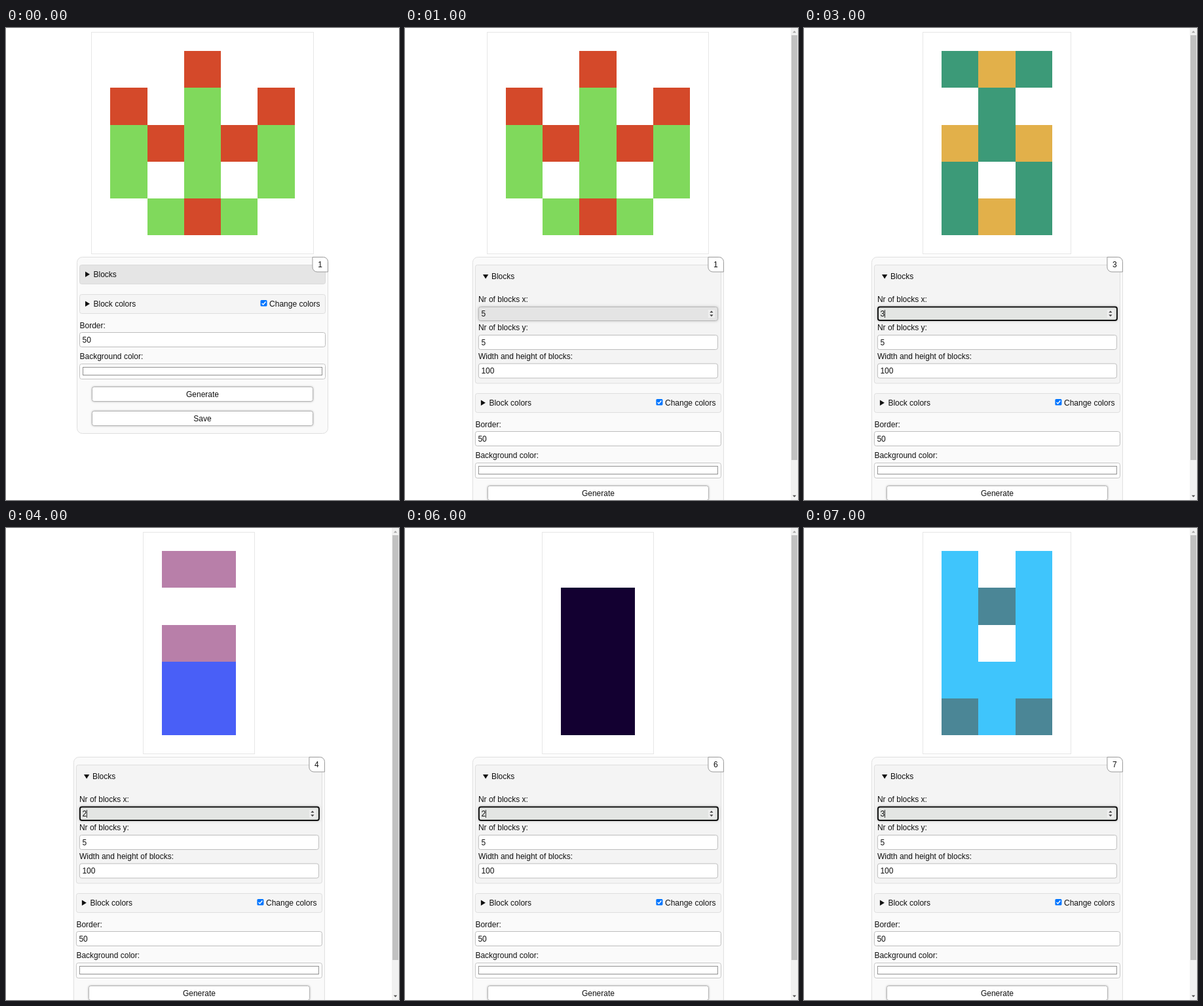
These frames come from a looping animation (600 by 720 pixels, 8 s). An HTML page:

```html
<!DOCTYPE html>
<html lang="en">
<head>
<meta charset="utf-8">
<title>Block generator</title>
<style>
  html, body { margin: 0; width: 100%; height: 100%; overflow: hidden; background: #fff; }
  svg { display: block; width: 600px; height: 720px; }
  text { font: 12px "Liberation Sans", Arial, sans-serif; fill: #111; white-space: pre; }
  .raised { filter: drop-shadow(0 0 1.5px rgba(0, 0, 0, .3)); }
  .hover { filter: drop-shadow(0 0 2px rgba(0, 0, 0, .2)); }
</style>
</head>
<body>
<svg id="stage" viewBox="0 0 600 720"></svg>
<script>
const STEP = 1000;
const CELL = 56.25;
const PAD = CELL / 2;

// Each step: block colors a and b, rows of blocks (dot = empty)
const steps = [
  { a: '#d4492a', b: '#80d95c', rows: '..a.. a.b.a babab b.b.b .bab.' },
  { a: '#d4492a', b: '#80d95c', rows: '..a.. a.b.a babab b.b.b .bab.' },
  { a: '#613665', b: '#f08086', rows: 'aaaa a..a b..b aaaa baab' },
  { a: '#3c9a78', b: '#e2b04a', rows: 'aba .a. bab a.a aba' },
  { a: '#b87fa9', b: '#495ff7', rows: 'aa .. aa bb bb' },
  { a: '#c4683f', b: '#5a8fb0', rows: 'a b . a b' },
  { a: '#130031', b: '#130031', rows: '.. aa aa aa aa' },
  { a: '#3fc5fc', b: '#4b8696', rows: 'a.a aba a.a aaa bab' },
];

const stage = document.getElementById('stage');

const box = (x, y, w, h, fill, stroke = 'none', r = 0, extra = '') =>
  `<rect x="${x}" y="${y}" width="${w}" height="${h}" rx="${r}" fill="${fill}" stroke="${stroke}" ${extra}/>`;
const label = (x, y, str, anchor = 'start') =>
  `<text x="${x}" y="${y}" text-anchor="${anchor}">${str}</text>`;
const shape = (d, fill = '#111', extra = '') => `<path d="${d}" fill="${fill}" ${extra}/>`;
const field = (x, y, w, value) =>
  box(x, y, w, 22, '#fff', '#bdbdbd', 3) + label(x + 4, y + 15, value);
const button = (y, str) =>
  box(-168.5, y, 337, 22, '#fff', '#b5b5b5', 3, 'class="raised"') + label(0, y + 15, str, 'middle');

function picture({ a, b, rows }, cx) {
  const grid = rows.split(' ');
  const cols = grid[0].length;
  const left = cx - cols * CELL / 2;
  const x0 = Math.round(left - PAD) - .5;
  const x1 = Math.round(left + cols * CELL + PAD) + .5;
  let out = box(x0, 6.5, x1 - x0, 338, '#fff', '#e6e6e6');
  grid.forEach((row, j) => [...row].forEach((c, i) => {
    if (c === '.') return;
    const x = Math.round(left + i * CELL), y = Math.round(35 + j * CELL);
    const w = Math.round(left + (i + 1) * CELL) - x;
    const h = Math.round(35 + (j + 1) * CELL) - y;
    out += box(x, y, w, h, c === 'a' ? a : b);
  }));
  return out;
}

function blocksOpen(cols, focused) {
  const input = focused
    ? box(-182, 425.5, 365, 20.5, '#e3e5e3', '#111', 3, 'stroke-width="2" class="hover"')
    : box(-182.5, 425.5, 365, 21, '#e4e4e4', '#b5b5b5', 3, 'class="hover"');
  return box(-187.5, 361.5, 375, 180.5, '#f4f4f4', '#dedede', 3)
    + shape('M-176 376h8.4l-4.2 6.6z') + label(-163, 383, 'Blocks')
    + label(-183, 418, 'Nr of blocks x:') + input + label(-178.5, 440, cols)
    + (focused ? box(-172, 430, 1, 12, '#333') : '')
    + box(168, 430, 10, 12, '#efefef')
    + shape('M170.3 434.3l2.7-3 2.7 3zM170.3 437.2l2.7 3 2.7-3z', '#444')
    + label(-183, 461, 'Nr of blocks y:') + field(-182.5, 468.5, 365, 5)
    + label(-183, 505, 'Width and height of blocks:') + field(-182.5, 512, 365, 100);
}

const blocksClosed = () =>
  box(-187.5, 361.5, 375, 29, '#e5e5e5', '#dadada', 3)
  + shape('M-179 371.5v8.4l7-4.2z') + label(-166.5, 380, 'Blocks');

const settings = () =>
  box(-187.5, 406.5, 375, 29, '#f5f5f5', '#dedede', 3)
  + shape('M-179 416.5v8.4l7-4.2z') + label(-166.5, 425, 'Block colors')
  + box(88.5, 415, 10, 9.5, '#0075ff', 'none', 1.5)
  + shape('M90.7 420l2 2 3.8-4.6', 'none', 'stroke="#fff" stroke-width="1.5"')
  + label(179.5, 425, 'Change colors', 'end')
  + label(-187.5, 458, 'Border:') + field(-187.5, 464.5, 375, 50)
  + label(-187.5, 505, 'Background color:')
  + box(-187.5, 512.5, 375, 23, '#fff', '#c4c4c4', 3)
  + box(-182.5, 517.5, 365, 12, '#fff', '#8f8f8f')
  + button(547.5, 'Generate') + button(584.5, 'Save');

const scrollbar = () =>
  box(589, 0, 11, 720, '#f1f1f1') + box(590, 11, 9, 648, '#c1c1c1')
  + shape('M591.8 7.3l2.7-3 2.7 3z', '#a3a3a3') + shape('M591.8 712.7l2.7 3 2.7-3z', '#505050');

function render(index) {
  const step = steps[index];
  const open = index > 0;
  const cols = step.rows.indexOf(' ');
  const cx = open ? 294.6 : 300;
  const panelX = open ? 294.9 : 300;
  const shift = open ? 151 : 0;
  stage.innerHTML = picture(step, cx)
    + `<g transform="translate(${panelX})">`
    + box(-191.5, 349.5, 383, 269 + shift, '#fafafa', '#dfdfdf', 8)
    + (open ? blocksOpen(cols, index > 1) : blocksClosed())
    + `<g transform="translate(0 ${shift})">${settings()}</g>`
    + shape('M168 349.5H184.5a7 7 0 0 1 7 7V372H175a7 7 0 0 1-7-7z', '#fff', 'stroke="#999"')
    + label(179.5, 365, Math.max(1, index), 'middle')
    + '</g>' + (open ? scrollbar() : '');
}

let shown = -1;
const start = performance.now();
function tick() {
  const index = Math.floor((performance.now() - start) / STEP) % steps.length;
  if (index !== shown) render(shown = index);
  requestAnimationFrame(tick);
}
tick();
</script>
</body>
</html>
```
